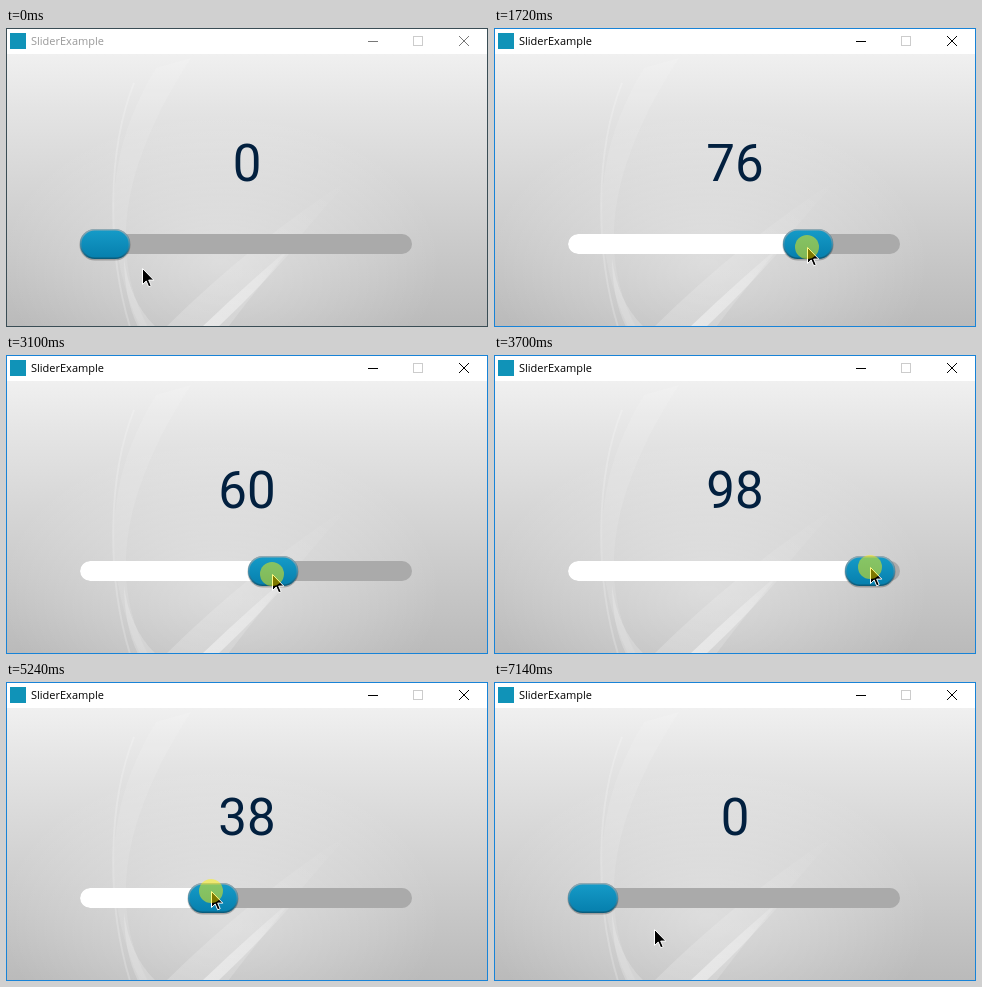
Write an HTML page that moves like this. It is 482 px wide and 299 px high and loops after 7.19 s.

```html
<!DOCTYPE html>
<html lang="en">
<head>
<meta charset="utf-8">
<title>SliderExample</title>
<style>
  html, body { margin: 0; width: 100%; height: 100%; overflow: hidden; }
  svg { display: block; width: 482px; height: 299px; }
  .title { font: 11px "Open Sans", "Noto Sans", sans-serif; }
  .value { font: 51px Roboto, sans-serif; fill: #02203f; text-anchor: middle; }
</style>
</head>
<body>
<svg viewBox="0 0 482 299">
  <defs>
    <linearGradient id="backdrop" x2="0" y2="1">
      <stop offset="0" stop-color="#f0f0f0"/>
      <stop offset=".2" stop-color="#e4e4e4"/>
      <stop offset=".55" stop-color="#d2d2d2"/>
      <stop offset="1" stop-color="#bababa"/>
    </linearGradient>
    <radialGradient id="glow">
      <stop offset="0" stop-color="#fff" stop-opacity=".4"/>
      <stop offset="1" stop-color="#fff" stop-opacity="0"/>
    </radialGradient>
    <linearGradient id="beam" x1="0" y1="1" x2="1" y2="0">
      <stop offset="0" stop-color="#fff" stop-opacity=".45"/>
      <stop offset=".5" stop-color="#fff" stop-opacity=".3"/>
      <stop offset="1" stop-color="#fff" stop-opacity="0"/>
    </linearGradient>
    <linearGradient id="face" x2="0" y2="1">
      <stop offset="0" stop-color="#159bc8"/>
      <stop offset="1" stop-color="#067fad"/>
    </linearGradient>
    <linearGradient id="rim" x2="0" y2="1">
      <stop offset="0" stop-color="#8fa9b3"/>
      <stop offset=".5" stop-color="#3f8fae"/>
      <stop offset="1" stop-color="#0a5c7c"/>
    </linearGradient>
    <clipPath id="client"><rect x="1" y="26" width="480" height="272"/></clipPath>
  </defs>

  <rect width="482" height="299" fill="#fff"/>
  <g clip-path="url(#client)">
    <rect y="26" width="482" height="273" fill="url(#backdrop)"/>
    <ellipse cx="215" cy="235" rx="220" ry="150" fill="url(#glow)"/>
    <path d="M134 299C98 220 95 130 150 40L185 30C120 130 100 220 142 299Z" fill="#fff" opacity=".1"/>
    <path d="M124 299C100 220 102 120 128 55" fill="none" stroke="#fff" stroke-width="2" opacity=".2"/>
    <path d="M118 230Q124 275 150 299H132Q118 270 118 230Z" fill="#fff" opacity=".2"/>
    <path d="M160 299Q245 215 345 150Q290 210 222 299Z" fill="url(#beam)" opacity=".45"/>
    <path d="M196 299Q245 252 300 206Q262 252 212 299Z" fill="url(#beam)"/>
  </g>

  <rect x="4" y="5" width="16" height="16" fill="#1093b8"/>
  <text id="title" class="title" x="25" y="17">SliderExample</text>
  <g id="buttons" fill="none">
    <path d="M362 13.5h10"/>
    <path d="M453 8l10 10M463 8l-10 10"/>
  </g>
  <rect x="407.5" y="8.5" width="9" height="9" fill="none" stroke="#ccc"/>

  <text id="value" class="value" x="241" y="153">0</text>

  <rect x="74" y="206" width="332" height="20" rx="10" fill="#aaa"/>
  <rect id="fill" x="74" y="206" height="20" rx="10" fill="#fff"/>
  <g id="thumb">
    <rect x="-.5" y="201" width="51" height="31.5" rx="15.5" fill="#000" opacity=".25"/>
    <rect x=".75" y="201.75" width="48.5" height="28.5" rx="14" fill="url(#face)" stroke="url(#rim)" stroke-width="1.5"/>
  </g>
  <g id="pointer">
    <path d="M.5 .5V16.5L4.2 13L6.7 18.8L9.2 17.7L6.7 12.1H11.8Z" fill="#000" stroke="#fff"/>
    <circle id="press" r="12" fill="#fff200" opacity=".49"/>
  </g>
  <rect id="frame" x=".5" y=".5" width="481" height="298" fill="none"/>
</svg>

<script>
const LOOP = 7190, ACTIVATE = 390, RELEASE = 6700;
const TRACK_LEFT = 74, TRAVEL = 282;

// Keys are [time in ms, position in px].
const thumbKeys = [
  [0, 74], [560, 74], [760, 93], [1030, 150], [1260, 203], [1500, 268],
  [1680, 290], [2000, 245], [2300, 191], [2510, 172], [2610, 165],
  [2740, 181], [3100, 242], [3480, 326], [3700, 351], [3830, 356],
  [4300, 356], [4600, 292], [4960, 206], [5240, 182], [5700, 167],
  [6220, 114], [6400, 87], [6560, 74], [LOOP, 74]
];
const gripKeys = [
  [0, 62], [360, 24], [560, 24], [1030, 32], [1300, 30], [1680, 24],
  [2510, 23], [3700, 25], [5240, 23], [6220, 24], [RELEASE, 24],
  [7140, 86], [LOOP, 86]
];
const heightKeys = [
  [0, 240], [360, 220], [800, 221], [1030, 219], [2510, 219], [3000, 219],
  [3700, 212], [5240, 209], [6220, 209], [RELEASE, 212], [7140, 247], [LOOP, 247]
];

const slope = (a, b) => (b[1] - a[1]) / (b[0] - a[0]);

// Smooth curve through the keys without overshoot.
function tangent(keys, i) {
  if (i === 0 || i === keys.length - 1) return 0;
  const a = slope(keys[i - 1], keys[i]), b = slope(keys[i], keys[i + 1]);
  return a * b > 0 ? 2 * a * b / (a + b) : 0;
}

function sample(keys, t) {
  const i = Math.max(0, keys.findIndex(key => key[0] > t) - 1);
  const [t0, p0] = keys[i], [t1, p1] = keys[i + 1];
  const d = t1 - t0, u = (t - t0) / d, v = 1 - u;
  return v * v * ((1 + 2 * u) * p0 + u * d * tangent(keys, i))
       + u * u * ((1 + 2 * v) * p1 - v * d * tangent(keys, i + 1));
}

const $ = id => document.getElementById(id);

function render(t) {
  const left = sample(thumbKeys, t), active = t >= ACTIVATE;
  const x = Math.round(left);
  const pointerX = Math.round(left + sample(gripKeys, t));
  const pointerY = Math.round(sample(heightKeys, t));

  $("value").textContent = Math.round((left - TRACK_LEFT) / TRAVEL * 100);
  $("fill").setAttribute("width", x - TRACK_LEFT + 25);
  $("thumb").setAttribute("transform", `translate(${x} 0)`);
  $("pointer").setAttribute("transform", `translate(${pointerX} ${pointerY})`);
  $("press").setAttribute("visibility", active && t < RELEASE ? "visible" : "hidden");
  $("title").setAttribute("fill", active ? "#000" : "#999");
  $("buttons").setAttribute("stroke", active ? "#000" : "#777");
  $("frame").setAttribute("stroke", active ? "#1883d7" : "#3a4d55");
}

const start = performance.now();
function tick() {
  render((performance.now() - start) % LOOP);
  requestAnimationFrame(tick);
}
tick();
</script>
</body>
</html>
```
